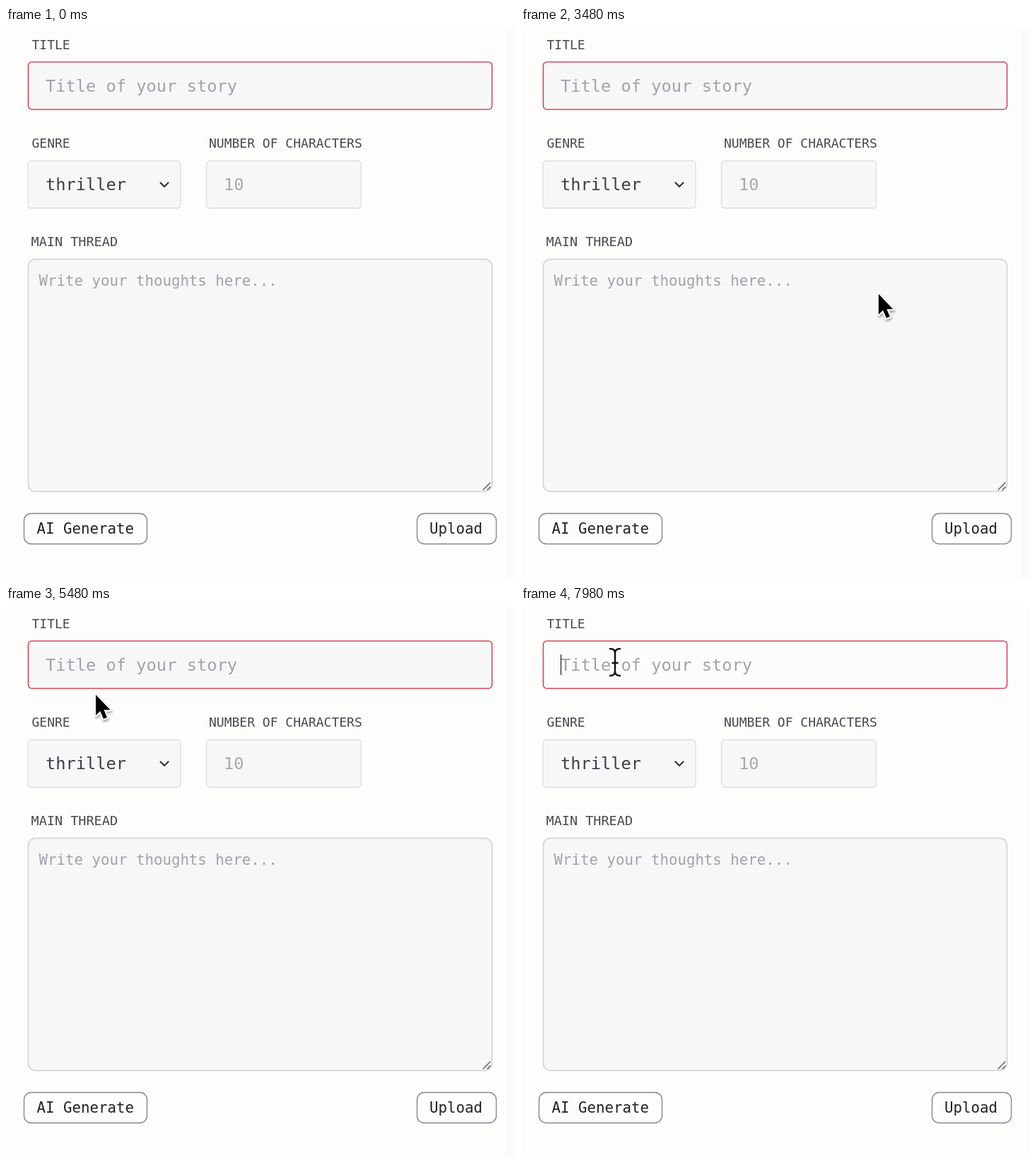
These frames come from a looping animation (720x778 px, 8000 ms). An HTML page:

```html
<!DOCTYPE html>
<html lang="en">
<head>
<meta charset="utf-8">
<style>
  html, body { margin: 0; width: 100%; height: 100%; overflow: hidden; background: #fdfdfc; }
  svg { display: block; width: 100%; height: 100%; }
  text { font-family: "DejaVu Sans Mono", monospace; white-space: pre; }
  .label { font-size: 18px; fill: #48484c; }
  .field { font-size: 23.7px; }
  .body { font-size: 20.75px; }
  .hint { fill: #a2a2ae; }
  .box { fill: #f7f7f7; stroke: #dedee3; stroke-width: 1.3; }
  .button { fill: #fdfdfc; stroke: #88888c; stroke-width: 1.4; }
  .line { fill: none; stroke-linecap: round; stroke-linejoin: round; }
</style>
</head>
<body>
<svg viewBox="0 0 720 778">
  <defs>
    <filter id="shadow" x="-50%" y="-50%" width="200%" height="200%">
      <feDropShadow dx="1" dy="2.5" stdDeviation="1.8" flood-color="#000" flood-opacity=".35"/>
    </filter>
    <path id="beam" class="line" d="M-7-19Q0-19 0-13V13Q0 19-7 19M7-19Q0-19 0-13M0 13Q0 19 7 19M-3.5 1H3.5"/>
  </defs>
  <rect width="720" height="778" fill="#fdfdfc"/>
  <rect id="edge" x="708" width="12" height="778" fill="#fbfbfb"/>

  <text class="label" x="36.5" y="29.5">TITLE</text>
  <rect id="title" class="box" x="31.5" y="48" width="656" height="67" rx="5" style="stroke:#d4485f;stroke-width:1.6"/>
  <text class="field hint" x="56" y="90">Title of your story</text>
  <path id="caret" d="M56.5 67V96" stroke="#333" stroke-width="1.4"/>

  <text class="label" x="36.5" y="169">GENRE</text>
  <rect class="box" x="31" y="187.5" width="216" height="67" rx="5"/>
  <text class="field" x="56" y="229" fill="#3d3d4c">thriller</text>
  <path class="line" d="M218.5 218.5L224 224L229.5 218.5" stroke="#33333c" stroke-width="2.2"/>

  <text class="label" x="287" y="169">NUMBER OF CHARACTERS</text>
  <rect class="box" x="283.5" y="187.5" width="219" height="67" rx="5"/>
  <text class="field" x="308" y="229" fill="#a9a9aa">10</text>

  <text class="label" x="35.5" y="308" style="font-size:18.5px">MAIN THREAD</text>
  <rect class="box" x="31.5" y="326.5" width="656" height="328" rx="10" style="stroke:#d0d0d6;stroke-width:1.5"/>
  <text class="body hint" x="46.5" y="364">Write your thoughts here...</text>
  <path class="line" d="M675 652L685 642M681 652L685 648" stroke="#55555a" stroke-width="1.3"/>

  <rect class="button" x="25.5" y="685.5" width="174" height="43" rx="10"/>
  <text class="body" x="43.5" y="714" fill="#222">AI Generate</text>
  <rect class="button" x="581.5" y="685.5" width="112" height="43" rx="10"/>
  <text class="body" x="599" y="714" fill="#222">Upload</text>

  <g id="arrow" filter="url(#shadow)">
    <path d="M1 3V32L7.3 26L12 37L17 34.8L12.5 24.3H21.5Z" fill="#000" stroke="#fff" stroke-width="4" stroke-linejoin="round" paint-order="stroke"/>
  </g>
  <g id="ibeam">
    <use href="#beam" stroke="#fff" stroke-width="4.5"/>
    <use href="#beam" stroke="#111" stroke-width="2.5"/>
  </g>
</svg>
<script>
const LOOP = 8000, ENTER = 3150, BEAM = 6700, FOCUS = 7600;
const $ = id => document.getElementById(id);
const ease = p => p * p * (3 - 2 * p);
const easeOut = p => 1 - (1 - p) ** 2;
const linear = p => p;

// time, x, y, easing of the move towards the stop
const arrowStops = [
  [ENTER, 722, 499], [3200, 693, 490], [3220, 693, 490], [3240, 661, 487],
  [3340, 661, 487], [3740, 392, 290, easeOut],
  [4220, 392, 290], [4660, 126, 121, ease],
  [5580, 126, 121], [6150, 121, 90, ease],
  [6420, 121, 90], [BEAM, 128, 79, ease]
];
const beamStops = [[BEAM, 129, 79], [7200, 130, 78, ease], [7400, 130, 78], [7700, 133, 78, ease]];

function at(stops, t) {
  const i = stops.findIndex(s => s[0] > t);
  if (i === 0) return stops[0].slice(1, 3);
  if (i < 0) return stops[stops.length - 1].slice(1, 3);
  const [t0, x0, y0] = stops[i - 1], [t1, x1, y1, curve = linear] = stops[i];
  const k = curve((t - t0) / (t1 - t0));
  return [x0 + (x1 - x0) * k, y0 + (y1 - y0) * k];
}

function show(id, visible) {
  $(id).style.display = visible ? "" : "none";
}

function place(id, stops, t, visible) {
  show(id, visible);
  if (visible) $(id).setAttribute("transform", `translate(${at(stops, t)})`);
}

function draw(t) {
  place("arrow", arrowStops, t, t >= ENTER && t < BEAM);
  place("ibeam", beamStops, t, t >= BEAM);
  show("edge", t < 5580);
  show("caret", t >= FOCUS);
  $("title").style.fill = t >= FOCUS ? "#fcfcfc" : "";
}

const start = performance.now();
function tick() {
  draw((performance.now() - start) % LOOP);
  requestAnimationFrame(tick);
}
tick();
</script>
</body>
</html>
```
